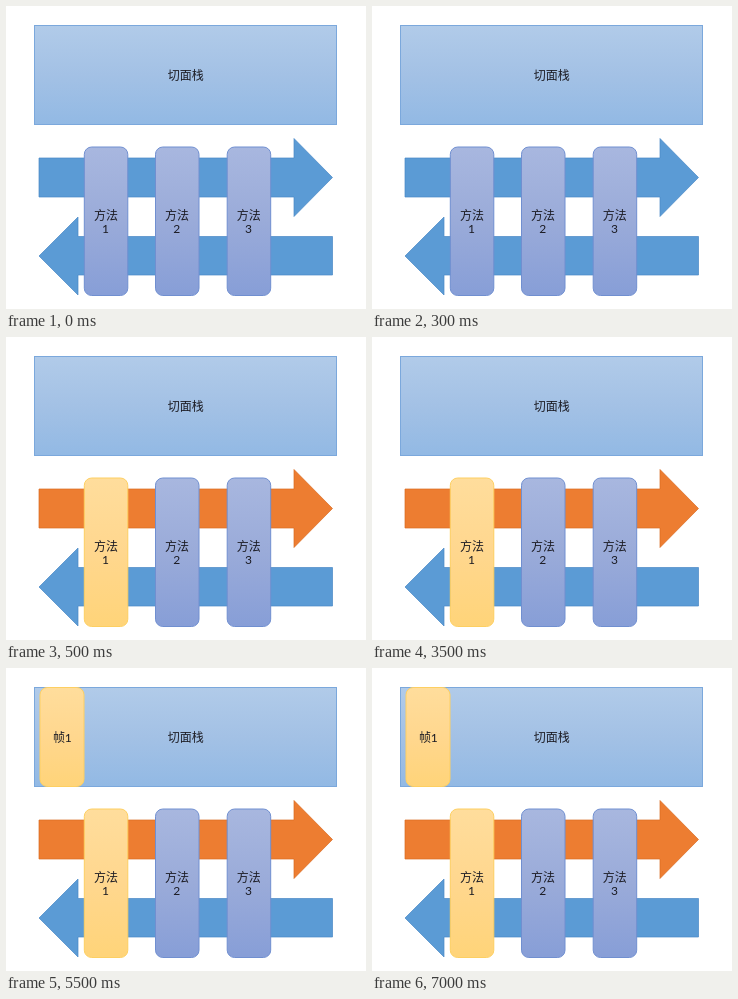
An HTML page that plays this animation: 360 by 303 pixels, repeating every 8 s.

```html
<!DOCTYPE html>
<html lang="zh-CN">
<head>
<meta charset="utf-8">
<title>切面栈</title>
<style>
  html, body { margin: 0; width: 100%; height: 100%; overflow: hidden; background: #fff; }
  svg { display: block; width: 360px; height: 303px; }
  text { font: 350 12px "Noto Sans CJK SC", "Noto Sans CJK", sans-serif; text-anchor: middle; fill: #1c1c24; }
  .digit { font: 12px Lato, "Open Sans", sans-serif; }
  .panel { fill: url(#sky); stroke: #7ba8dc; }
  .card { fill: url(#violet); stroke: #708fd0; }
  .active .card { fill: url(#gold); stroke: #fdcf62; }
  .arrow { fill: #5b9bd5; stroke: #4a88c6; stroke-width: .7; }
  .active .arrow { fill: #ed7d31; stroke: #d86b22; }
  .active { opacity: 0; }
</style>
</head>
<body>
<svg viewBox="0 0 360 303">
  <defs>
    <linearGradient id="sky" x2="0" y2="1">
      <stop stop-color="#b1cbe9"/><stop offset=".5" stop-color="#a3c1e5"/><stop offset="1" stop-color="#92b9e4"/>
    </linearGradient>
    <linearGradient id="violet" x2="0" y2="1">
      <stop stop-color="#a8b7df"/><stop offset=".5" stop-color="#9aabd9"/><stop offset="1" stop-color="#879ed7"/>
    </linearGradient>
    <linearGradient id="gold" x2="0" y2="1">
      <stop stop-color="#ffdd9c"/><stop offset=".5" stop-color="#ffd78e"/><stop offset="1" stop-color="#ffd479"/>
    </linearGradient>
    <path id="forward" d="M33 152H288V132.5L326.5 171.5L288 210.5V191H33Z"/>
  </defs>

  <rect class="panel" x="28.5" y="19.5" width="302" height="99"/>
  <text x="179.8" y="73.5">切面栈</text>

  <g id="idleCall"><use class="arrow" href="#forward"/></g>
  <g class="active" id="call"><use class="arrow" href="#forward"/></g>
  <path class="arrow" d="M326.5 230.5H72V211L33 250L72 289V269H326.5Z"/>

  <g id="methods"></g>

  <g class="active" id="frame">
    <rect class="card" x="34" y="19.5" width="44" height="99" rx="7.3"/>
    <text x="53" y="73.5">帧</text>
    <text class="digit" x="62.3" y="73.5">1</text>
  </g>
</svg>
<script>
  const LOOP = 8000;
  const byId = id => document.getElementById(id);

  const cardRect = x =>
    `<rect class="card" x="${x}" y="141" width="43.5" height="148.5" rx="7.3"/>`;

  byId('methods').innerHTML = [78.3, 149.5, 221.2].map((x, i) => `
    <g id="idle${i + 1}">${cardRect(x)}</g>
    ${i === 0 ? `<g class="active" id="running">${cardRect(x)}</g>` : ''}
    <text x="${x + 21.6}" y="213.5">方法</text>
    <text class="digit" x="${x + 21.2}" y="227">${i + 1}</text>`).join('');

  // Switches a part's opacity once per loop, without a transition.
  const switchAt = (id, time, from, to) => {
    const offset = time / LOOP;
    byId(id).animate([
      { opacity: from, offset: 0 },
      { opacity: from, offset },
      { opacity: to, offset },
      { opacity: to, offset: 1 }
    ], { duration: LOOP, iterations: Infinity });
  };

  switchAt('idleCall', 500, 1, 0);
  switchAt('call', 500, 0, 1);
  switchAt('idle1', 500, 1, 0);
  switchAt('running', 500, 0, 1);
  switchAt('frame', 5500, 0, 1);
</script>
</body>
</html>
```
